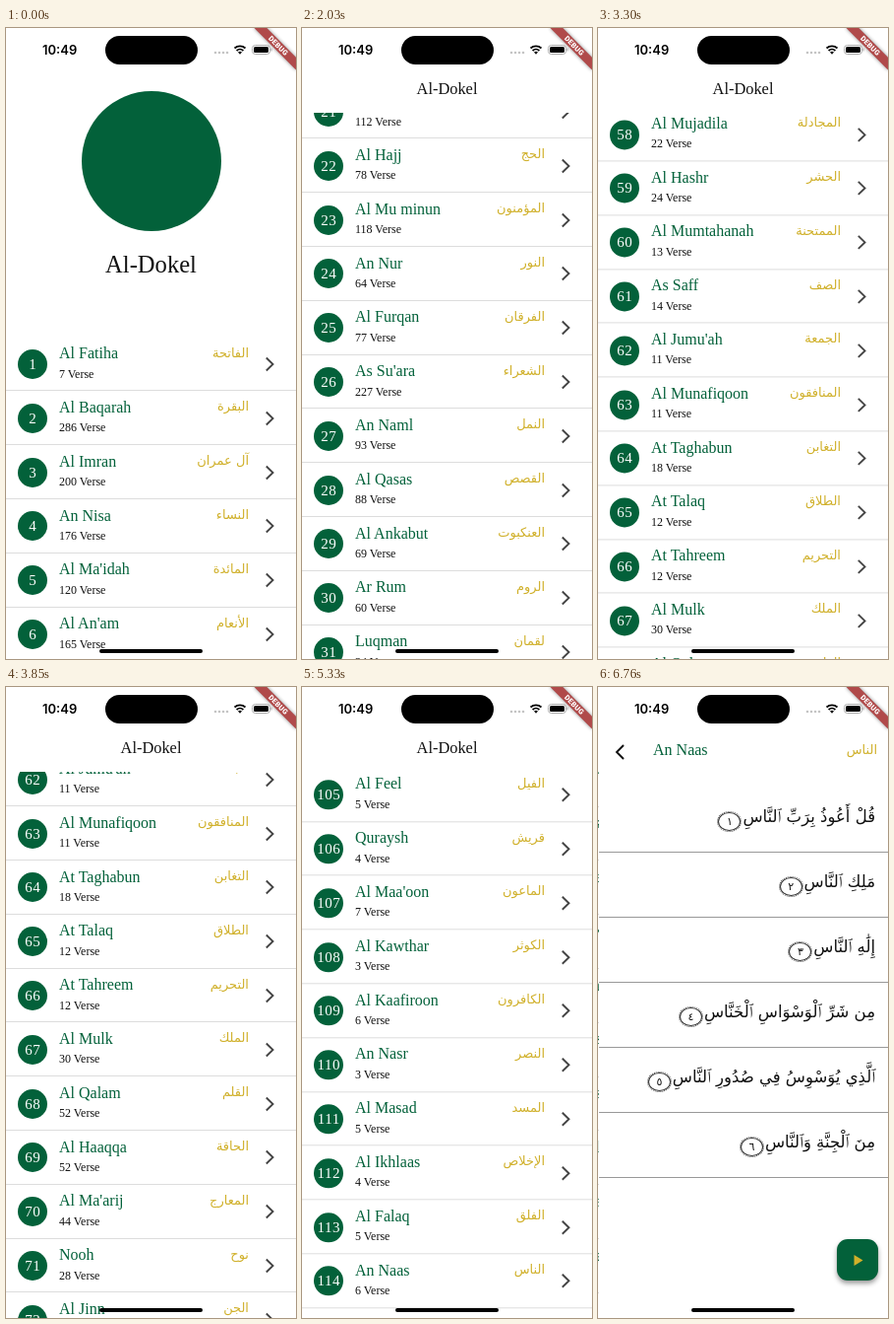
Animation of 295x640 px, one loop 8 s. Source, as an HTML page:

```html
<!DOCTYPE html>
<html lang="en">
<head>
<meta charset="utf-8">
<title>Chapter list</title>
<style>
  html, body { margin: 0; width: 100%; height: 100%; overflow: hidden; background: #fff; }
  body { --green: #03613a; --gold: #d0b02a; }
  #stage, .page { position: absolute; left: 0; top: 0; width: 295px; height: 640px; overflow: hidden; background: #fff; }
  #stage { font-family: "Liberation Serif", serif; color: #111; }
  #stage div, #stage svg, .row span { position: absolute; white-space: nowrap; }
  svg { fill: none; overflow: visible; }
  .ar { font-family: "DejaVu Sans", sans-serif; direction: rtl; }

  #list { left: 0; top: 313.6px; width: 295px; }
  .row { left: 0; width: 295px; height: 54.8px; }
  .row::after { content: ""; position: absolute; left: 0; right: 0; bottom: 0; height: 1px; background: #ddd; }
  .row .num { left: 12px; top: 12.4px; width: 30px; height: 30px; border-radius: 50%; background: var(--green);
    color: #fff; font-size: 15px; line-height: 30px; letter-spacing: .6px; text-indent: .6px; text-align: center; }
  .row .name { left: 54px; top: 6.6px; font-size: 16px; line-height: 20px; color: var(--green); }
  .row .count { left: 54px; top: 29px; font-size: 12px; line-height: 16px; }
  .row .ar { right: 48px; top: 6px; font-size: 13px; line-height: 20px; color: var(--gold); }
  .row svg { left: 264px; top: 20.4px; stroke: #444; stroke-width: 1.9; }

  #header { left: 0; top: 0; width: 295px; overflow: hidden; background: #fff; }
  #logo { left: 77px; top: 64px; width: 142px; height: 142px; border-radius: 50%; background: var(--green); }
  #title { left: 0; right: 0; bottom: 12px; height: 24px; font-size: 16.4px; line-height: 24px;
    text-align: center; transform-origin: 50% 100%; }

  #detail .name { left: 55px; top: 54px; font-size: 16px; line-height: 20px; color: var(--green); }
  #detail .arname { right: 12px; top: 54px; font-size: 13px; line-height: 20px; color: var(--gold); }
  .verse { left: 0; width: 295px; height: 66px; box-sizing: border-box; padding-right: 14px;
    border-bottom: 1px solid #999; font-size: 16.5px; line-height: 60px; }
  .mark { display: inline-block; box-sizing: border-box; width: 23px; height: 19px; margin: 0 2px;
    border: 1px solid #333; border-radius: 50%; outline: 1px dotted #555; outline-offset: 0;
    font-size: 11px; line-height: 17px; text-align: center; vertical-align: -3px; }
  #play { left: 242px; top: 560px; width: 42px; height: 42px; border-radius: 11px; background: var(--green);
    box-shadow: 0 3px 5px #0006; }

  #clock { left: 37px; top: 14px; font: 600 13px/16px Inter, sans-serif; color: #000; }
  #island { left: 101px; top: 8px; width: 94px; height: 29px; border-radius: 15px; background: #000; }
  #home { left: 95px; top: 630px; width: 105px; height: 4px; border-radius: 2px; background: #000; }
  #banner { left: 265px; top: 21px; width: 60px; height: 9px; transform: rotate(45deg); transform-origin: 30px -21px;
    background: #b04a4a; box-shadow: 0 0 4px #0007; color: #fff; text-align: center;
    font: 900 7.4px/9px Roboto, sans-serif; letter-spacing: .2px; }
</style>
</head>
<body>
<div id="stage">
  <div class="page" id="home-page">
    <div id="list"></div>
    <div id="header"><div id="logo"></div><div id="title">Al-Dokel</div></div>
  </div>
  <div class="page" id="detail">
    <svg width="10" height="16" style="left:17px;top:58px" stroke="#111" stroke-width="1.9"><path d="M8 1L1 8l7 7"/></svg>
    <div class="name">An Naas</div>
    <div class="ar arname">الناس</div>
    <div id="play"><svg width="42" height="42" style="left:0;top:0"><path d="M17.5 16v11l9-5.500z" fill="#d0b02a"/></svg></div>
  </div>
  <div id="clock">10:49</div>
  <div id="island"></div>
  <svg width="295" height="40" style="left:0;top:0">
    <g fill="#c4c4c4"><circle cx="213" cy="25" r="1.300"/><circle cx="217" cy="25" r="1.300"/><circle cx="221" cy="25" r="1.300"/><circle cx="225" cy="25" r="1.300"/></g>
    <path d="M232.500 20.500a8 8 0 0 1 11 0M234.600 23a5 5 0 0 1 6.800 0" stroke="#000" stroke-width="1.800"/>
    <path d="M238 26.800l-2-2.200a3 3 0 0 1 4 0z" fill="#000"/>
    <rect x="250.500" y="17.500" width="18" height="9" rx="3" stroke="#aaa"/>
    <rect x="252" y="19" width="15" height="6" rx="1.600" fill="#000"/>
    <path d="M270 20.500v3" stroke="#aaa"/>
  </svg>
  <div id="home"></div>
  <div id="banner">DEBUG</div>
</div>
<script>
const names = `Al Fatiha,Al Baqarah,Al Imran,An Nisa,Al Ma'idah,Al An'am,Al A'raf,Al Anfal,At Tawbah,Al Yunus,Hud,Yusuf,Ar Ra'd,Ibrahim,Al Hijr,An Nahl,Al Isra,Al Kahf,Maryam,Taha,Al Anbiya,Al Hajj,Al Mu minun,An Nur,Al Furqan,As Su'ara,An Naml,Al Qasas,Al Ankabut,Ar Rum,Luqman,As Sajdah,Al Ahzab,Saba,Fatir,Yasin,As Saffat,Sad,Az Zumar,Ghafir,Fussilat,Ash Shura,Az Zukhruf,Ad Dukhan,Al Jathiya,Al Ahqaf,Muhammad,Al Fath,Al Hujurat,Qaf,Adh Dhariyat,At Tur,An Najm,Al Qamar,Ar Rahman,Al Waqi'ah,Al Hadid,Al Mujadila,Al Hashr,Al Mumtahanah,As Saff,Al Jumu'ah,Al Munafiqoon,At Taghabun,At Talaq,At Tahreem,Al Mulk,Al Qalam,Al Haaqqa,Al Ma'arij,Nooh,Al Jinn,Al Muzzammil,Al Muddaththir,Al Qiyamah,Al Insaan,Al Mursalat,An Naba,An Naaziat,Abasa,At Takweer,Al Infitar,Al Mutaffifin,Al Inshiqaaq,Al Burooj,At Taariq,Al A'la,Al Ghaashiyah,Al Fajr,Al Balad,Ash Shams,Al Lail,Ad Dhuha,Ash Sharh,At Teen,Al Alaq,Al Qadr,Al Bayyinah,Az Zalzalah,Al Aadiyaat,Al Qaari'ah,At Takaathur,Al Asr,Al Humazah,Al Feel,Quraysh,Al Maa'oon,Al Kawthar,Al Kaafiroon,An Nasr,Al Masad,Al Ikhlaas,Al Falaq,An Naas`.split(',');
const arabic = `الفاتحة,البقرة,آل عمران,النساء,المائدة,الأنعام,الأعراف,الأنفال,التوبة,يونس,هود,يوسف,الرعد,ابراهيم,الحجر,النحل,الإسراء,الكهف,مريم,طه,الأنبياء,الحج,المؤمنون,النور,الفرقان,الشعراء,النمل,القصص,العنكبوت,الروم,لقمان,السجدة,الأحزاب,سبإ,فاطر,يس,الصافات,ص,الزمر,غافر,فصلت,الشورى,الزخرف,الدخان,الجاثية,الأحقاف,محمد,الفتح,الحجرات,ق,الذاريات,الطور,النجم,القمر,الرحمن,الواقعة,الحديد,المجادلة,الحشر,الممتحنة,الصف,الجمعة,المنافقون,التغابن,الطلاق,التحريم,الملك,القلم,الحاقة,المعارج,نوح,الجن,المزمل,المدثر,القيامة,الانسان,المرسلات,النبأ,النازعات,عبس,التكوير,الإنفطار,المطففين,الإنشقاق,البروج,الطارق,الأعلى,الغاشية,الفجر,البلد,الشمس,الليل,الضحى,الشرح,التين,العلق,القدر,البينة,الزلزلة,العاديات,القارعة,التكاثر,العصر,الهمزة,الفيل,قريش,الماعون,الكوثر,الكافرون,النصر,المسد,الإخلاص,الفلق,الناس`.split(',');
const counts = [7,286,200,176,120,165,206,75,129,109,123,111,43,52,99,128,111,110,98,135,112,78,118,64,77,227,93,88,69,60,34,30,73,54,45,83,182,88,75,85,54,53,89,59,37,35,38,29,18,45,60,49,62,55,78,96,29,22,24,13,14,11,11,18,12,12,30,52,52,44,28,28,20,56,40,31,50,40,46,42,29,19,36,25,22,17,19,26,30,20,15,21,11,8,8,19,5,8,8,11,11,8,3,9,5,4,7,3,6,3,5,4,5,6];
const verses = ['قُلْ أَعُوذُ بِرَبِّ ٱلنَّاسِ', 'مَلِكِ ٱلنَّاسِ', 'إِلَٰهِ ٱلنَّاسِ', 'مِن شَرِّ ٱلْوَسْوَاسِ ٱلْخَنَّاسِ', 'ٱلَّذِي يُوَسْوِسُ فِي صُدُورِ ٱلنَّاسِ', 'مِنَ ٱلْجِنَّةِ وَٱلنَّاسِ'];

const $ = id => document.getElementById(id);
const rowHeight = 54.8;

$('list').innerHTML = names.map((name, i) => `<div class="row" style="top:${i * rowHeight}px">
  <span class="num">${i + 1}</span><span class="name">${name}</span><span class="count">${counts[i]} Verse</span>
  <span class="ar">${arabic[i]}</span><svg width="9" height="14"><path d="M.8 .5L7.500 7 .8 13.500"/></svg></div>`).join('');

$('detail').insertAdjacentHTML('beforeend', verses.map((text, i) =>
  `<div class="verse ar" style="top:${101.5 + i * 66.1}px">${text}<span class="mark">${'١٢٣٤٥٦'[i]}</span></div>`).join(''));

// The screen refreshes in bursts: [first, last, number of refreshes]
const refreshes = [0];
for (const [first, last, n] of [[980, 1200, 3], [1310, 2030, 8], [2130, 2130, 1], [2340, 3300, 10], [3420, 3850, 5],
  [3990, 4430, 5], [4540, 4640, 2], [4810, 5330, 6], [5450, 6020, 6], [6650, 6760, 2]])
  for (let k = 0; k < n; k++) refreshes.push(first + (last - first) * k / Math.max(1, n - 1));

// Flings as [time, scroll offset]; the last one overshoots and springs back
const path = [[0, 0], [930, 0], [1200, 475], [1500, 975], [1800, 1265], [2030, 1352], [2130, 1362], [2290, 1362],
  [2700, 2350], [3000, 2960], [3300, 3356.6], [3600, 3540], [3850, 3590], [3930, 3590], [4200, 4080], [4430, 4337],
  [4640, 4400], [4740, 4400], [5000, 5150], [5200, 5690], [5330, 5930.7], [5450, 5990], [5570, 5972],
  [5670, 5958], [5800, 5949], [6020, 5946], [8000, 5946]];

const slope = i => (path[i + 1][1] - path[i][1]) / (path[i + 1][0] - path[i][0]);
function tangent(i) {
  if (i === 0 || i === path.length - 1) return 0;
  const a = slope(i - 1), b = slope(i);
  return a * b > 0 ? 2 * a * b / (a + b) : 0;
}
function scrollAt(t) {
  let i = 0;
  while (i < path.length - 2 && t >= path[i + 1][0]) i++;
  const [t0, a] = path[i], [t1, b] = path[i + 1], d = t1 - t0, u = (t - t0) / d, v = 1 - u;
  return a * v * v * (1 + 2 * u) + b * u * u * (3 - 2 * u) + d * u * v * (tangent(i) * v - tangent(i + 1) * u);
}

function draw(now) {
  const time = now % 8000;
  const t = refreshes.findLast(r => r <= time) ?? 0;
  const scroll = scrollAt(t);
  const expanded = 270, collapsed = 86.3, range = expanded - collapsed;
  const fold = Math.min(1, scroll / range);

  $('list').style.transform = `translateY(${-scroll}px)`;
  $('header').style.height = expanded - fold * range + 'px';
  $('title').style.transform = `scale(${1.5 - fold / 2})`;
  $('logo').style.transform = `translateY(${-fold * range / 4}px)`;
  $('logo').style.opacity = Math.min(1, (1 - fold) / .23);

  const x = 295 * Math.exp(-Math.max(0, t - 6590) / 30);
  $('detail').style.transform = `translateX(${x}px)`;
  $('home-page').style.transform = `translateX(${(x - 295) / 3}px)`;
  requestAnimationFrame(draw);
}
draw(0);
</script>
</body>
</html>
```
